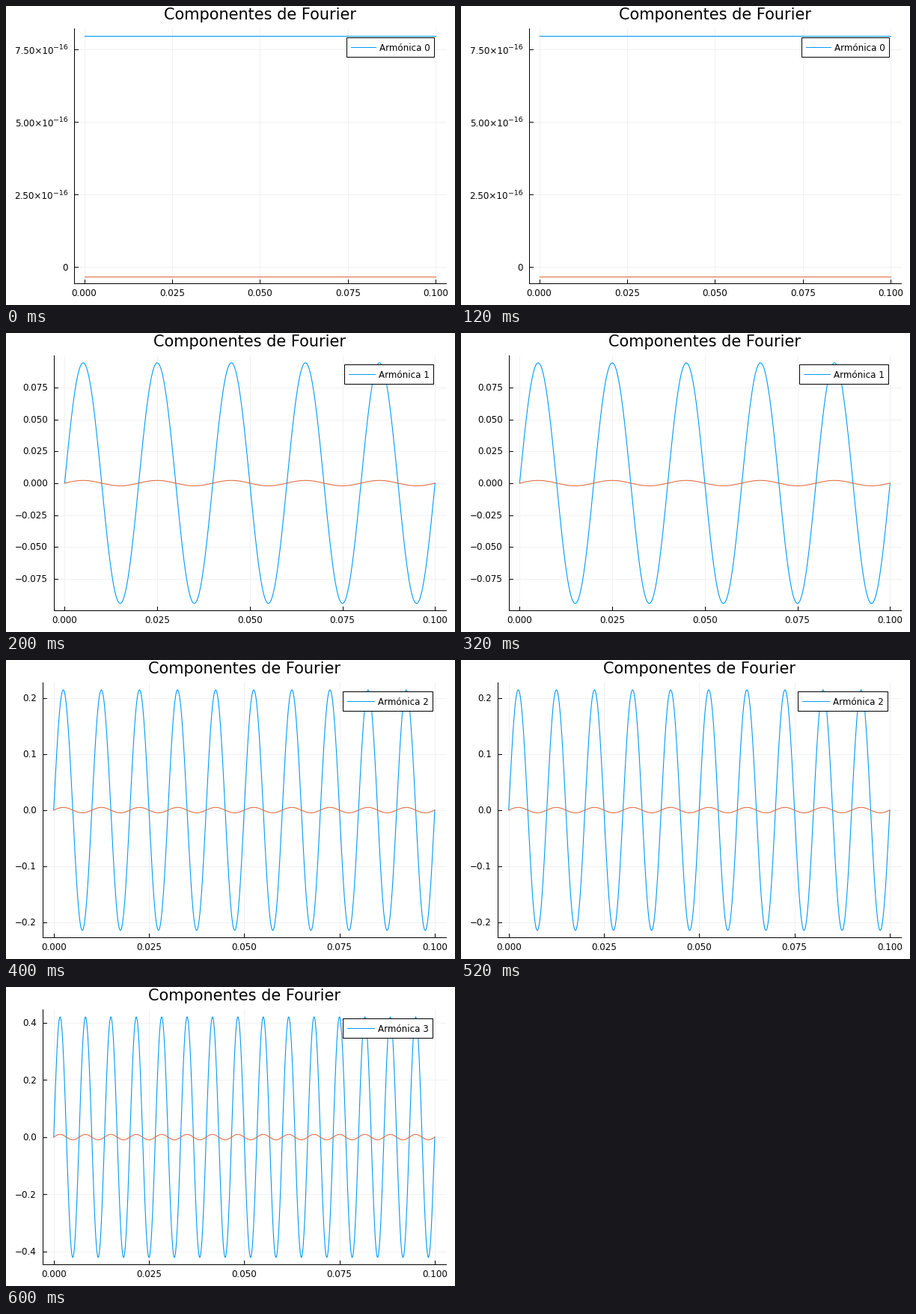
Animation of 600x400 px, one loop 0.8 s. Source, as a matplotlib script:

```python
import numpy as np
import matplotlib.pyplot as plt
from matplotlib.animation import FuncAnimation
from matplotlib.patches import Rectangle

W, H, DPI = 600, 400, 100
PT = 72 / DPI  # points per pixel
RIGHT, TOP, BOTTOM = 588.2, 30.3, 371.4
BLUE, ORANGE = "#009AFA", "#E26F46"
PAD = 0.03 / 1.06
DURATION, BASE_FREQ = 0.1, 50
SMALL, LARGE = 11.9, 20.83

plt.rcParams.update({"font.family": "DejaVu Sans", "path.simplify": False})

# left edge, amplitude of each component, y ticks, tick decimals
HARMONICS = [
    (90.5, (7.96e-16, -0.32e-16), np.arange(4) * 2.5e-16, None),
    (63.5, (0.0943, 0.0021), np.arange(-3, 4) * 0.025, 3),
    (48.5, (0.2146, 0.0048), np.arange(-2, 3) * 0.1, 1),
    (48.5, (0.4205, 0.0094), np.arange(-2, 3) * 0.2, 1),
]

fig = plt.figure(figsize=(W / DPI, H / DPI), dpi=DPI, facecolor="white")
ax = fig.add_axes([0, 0, 1, 1])


def line(x, y, color="black", width=1.0, **kw):
    ax.plot(x, y, color=color, lw=width * PT, **kw)


def text(x, y, s, size=SMALL, ha="left"):
    ax.text(x, y, s, fontsize=size * PT, ha=ha, va="baseline")


def y_label(x, y, value, decimals):
    if decimals is not None:
        label = f"{round(value, decimals) + 0.0:.{decimals}f}"
        text(x, y + 4.3, label.replace("-", "−"), ha="right")
    elif value == 0:
        text(x, y + 4.3, "0", ha="right")
    else:
        text(x - 19.8, y + 6, f"{value * 1e16:.2f}×10", ha="right")
        text(x, y + 0.4, "−16", size=9.4, ha="right")


def legend(n, width):
    right = RIGHT - width / 30
    text_x = right - 68 - width / 110
    line_end = text_x - width / 100
    line_start = line_end - width / 15
    left = line_start - width / 90
    ax.add_patch(Rectangle((left, 42), right - left, 26, fc="white",
                           ec="black", lw=PT, zorder=5))
    line([line_start, line_end], [55.4, 55.4], BLUE, zorder=6)
    ax.text(text_x, 59.5, f"Armónica {n}", fontsize=SMALL * PT,
            va="baseline", zorder=6)


def draw(n):
    ax.clear()
    ax.set(xlim=(0, W), ylim=(H, 0))
    ax.axis("off")
    left, amps, y_ticks, decimals = HARMONICS[n]
    width, height = RIGHT - left, BOTTOM - TOP
    low, high = (min(amps), max(amps)) if n == 0 else (-amps[0], amps[0])

    def px(t):
        return left + width * (PAD + (1 - 2 * PAD) * t / DURATION)

    def py(v):
        return BOTTOM - height * (PAD + (1 - 2 * PAD) * (v - low) / (high - low))

    for t in np.linspace(0, DURATION, 5):
        x = px(t)
        line([x, x], [TOP, BOTTOM], "#f1f1f1", zorder=1)
        line([x, x], [BOTTOM, BOTTOM - 5], zorder=4)
        text(x, 387.7, f"{t:.3f}", ha="center")
    for v in y_ticks:
        y = py(v)
        line([left, RIGHT], [y, y], "#f1f1f1", zorder=1)
        line([left, left + 5], [y, y], zorder=4)
        y_label(left - 7.6, y, v, decimals)

    line([left, left], [TOP, BOTTOM], zorder=4)
    line([left, RIGHT], [BOTTOM, BOTTOM], zorder=4)

    t = np.linspace(0, DURATION, 1001)
    wave = np.sin(2 * np.pi * BASE_FREQ * n * t) if n else np.ones_like(t)
    for amp, color in zip(amps, (BLUE, ORANGE)):
        line(px(t), py(amp * wave), color, 1.1, zorder=3)

    legend(n, width)
    text((left + RIGHT) / 2, 18.4, "Componentes de Fourier", LARGE, "center")
    return []


anim = FuncAnimation(fig, draw, frames=len(HARMONICS), interval=200,
                     init_func=lambda: [], repeat=True)
plt.show()
```
